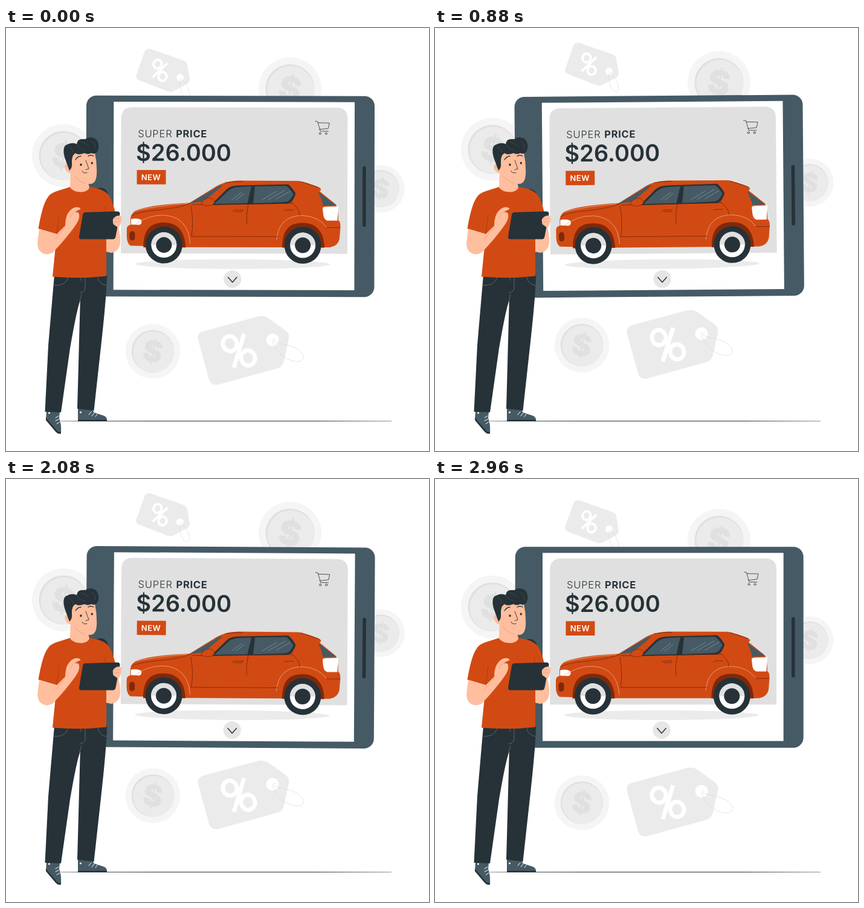
These frames come from a looping animation (700x700 px, 3 s). An HTML page:

```html
<!DOCTYPE html>
<html lang="en">
<head>
<meta charset="utf-8">
<title>Super price</title>
<style>
html, body { margin: 0; width: 100%; height: 100%; overflow: hidden; background: #fff; }
svg { display: block; width: 100vw; height: 100vh; }
text { font-family: Inter, Roboto, sans-serif; }
.line { fill: none; stroke: #263238; stroke-width: .7; stroke-linecap: round; stroke-linejoin: round; }
.dark { fill: #263238; }
.slate { fill: #455a64; }
.orange { fill: #d24a13; }
.maroon { fill: #80290a; }
.skin { fill: #ffbe9d; }
.pale { fill: #ebebeb; }
.grey { fill: #e0e0e0; }
.white { fill: #fff; }
</style>
</head>
<body>
<svg viewBox="0 0 700 700">
  <defs>
    <g id="coin">
      <circle r="52" fill="#f5f5f5"/>
      <circle r="40.5" class="grey"/>
      <circle cx="1.2" cy="1.2" r="38.8" class="pale"/>
      <text class="grey" transform="rotate(10)" y="20" font-size="56" font-weight="900" text-anchor="middle">$</text>
    </g>
    <g id="percent" fill="none" stroke="#fff" stroke-width="7">
      <ellipse cx="-15" cy="-11.5" rx="11.5" ry="12.5" transform="rotate(-15 -15 -11.5)"/>
      <ellipse cx="15" cy="12" rx="11.5" ry="12.5" transform="rotate(-15 15 12)"/>
      <path d="M8.500 -28L-8.500 28"/>
    </g>
    <g id="wheel">
      <path class="maroon" d="M-34 4C-34 -24 -24 -37 0 -37C23 -37 35 -22 36 4Z"/>
      <circle r="30.5" class="dark"/>
      <circle r="21" class="white"/>
      <path class="grey" d="M-21 0A21 21 0 0 1 21 0Z"/>
      <circle r="13" class="dark"/>
    </g>
  </defs>

  <g id="float">
    <use href="#coin" x="470" y="100.5"/>
    <use href="#coin" transform="translate(95 211)"/>
    <use href="#coin" transform="translate(243 535) scale(.87)"/>
    <use href="#coin" transform="translate(620 266) scale(.76)"/>

    <path class="pale" d="M240 35L294 54Q299 56 300 61L304 84Q305 89 300 92L278 104Q273 107 268 105L219 86Q214 83 215.500 78L229 40Q232 33 240 35Z"/>
    <circle cx="288" cy="82" r="6" class="white"/>
    <path class="line" style="stroke:#dcdcdc" d="M289 83Q303 96 304 110Q302 120 293 111Q286 98 288 86"/>
    <use href="#percent" transform="translate(255 70) rotate(30) scale(.58)"/>

    <path class="pale" d="M326 502L415 478Q426 475 434 480L463 501Q470 507 468 515L460 551Q458 560 450 563L352 590Q340 593 336 582L318 516Q315 506 326 502Z"/>
    <circle cx="441" cy="516" r="10.500" class="white"/>
    <path class="line" style="stroke:#dadada" d="M446 515Q440 513 442 521C449 541 470 553 484 552C497 550 494 538 480 530C470 524 455 524 443 518"/>
    <use href="#percent" x="385.500" y="534"/>
  </g>

  <path class="dark" d="M91 650.200Q365 649.700 638 650.200V650.800Q365 651.300 91 650.800Z"/>

  <g id="tablet">
    <rect class="slate" x="132.700" y="112.200" width="477" height="332.500" rx="16.500"/>
    <circle class="dark" cx="156" cy="278" r="13.200"/>
    <rect class="dark" x="590" y="228.500" width="5.600" height="100" rx="2.800"/>
    <rect class="white" x="178" y="122.300" width="398.700" height="311.300"/>
    <path class="grey" d="M190.300 373.300V150Q190.300 131.500 209 131.500H546.500Q565 131.500 565 150V373.300Z"/>
    <g class="dark">
      <text x="218" y="181" font-size="16.500" font-weight="300" letter-spacing=".8">SUPER</text>
      <text x="281" y="181" font-size="16.500" font-weight="700" letter-spacing=".7">PRICE</text>
      <text x="215" y="220" font-size="38" font-weight="600">$26.000</text>
    </g>
    <rect class="orange" x="216.500" y="235.300" width="48" height="23.700"/>
    <text class="white" x="223.700" y="252" font-size="13" font-weight="600" letter-spacing=".5">NEW</text>
    <g class="line" style="stroke-width:.8">
      <path d="M511.500 154L515.500 154.500L520 170.500H533M516 156.500L535 157L533 166L518.500 167.500"/>
      <circle cx="519.500" cy="174.300" r="1.600"/>
      <circle cx="529.500" cy="174.300" r="1.600"/>
    </g>
    <ellipse class="pale" cx="375" cy="390.800" rx="161" ry="8"/>
    <circle cx="375" cy="415.500" r="14.600" fill="#e6e6e6"/>
    <path class="line" style="stroke-width:1.500" d="M367.800 412.500L375 420.800L382.200 412.500"/>

    <g id="car">
      <path class="orange" d="M206 316Q207 305 218 301Q245 292 304 289.300L348 262Q362 253.500 384 252.500L484 252.800Q496 254.500 518 263.500Q524 266.500 519 270L545 291Q550 296 550 318Q554 320 553.500 330L552 349Q549 361 536 362.800L296 362.800L206 360.500Q200 356 200 345V333Q200 327 206 326Z"/>
      <path class="slate" d="M304 290L345 266Q350 261 359 260.500L327 287Z"/>
      <path class="dark" d="M339 293L365 267Q372 260.500 386 260.500L466 258.500Q470 259 479 273Q480 276 473 287Q470 290 464 290.500Z"/>
      <path class="slate" d="M345 291L367 270Q374 263.500 386 263L406 262L399.500 290Z"/>
      <path class="slate" d="M412 262L464 261Q469 265 475.500 274Q476 276 470 284Q467 287.500 460 288L409 290Z"/>
      <path class="slate" d="M516 270.500L546.500 293L525 294Q522 281 516 270.500Z"/>
      <path class="line" style="stroke:#90a0a8" d="M374 284L390 272M380 285L394 274M424 284L448 270M434 284L462 268M447 283L470 270"/>
      <path class="white" d="M207 316.500Q217 314 224 318Q226 324 221 326L207 325.500Z"/>
      <path class="white" d="M524 298Q525 295.500 529 295.500L550 295L548.500 318.500H532Q526 317 525 308Z"/>
      <rect class="maroon" x="204.500" y="336.500" width="9" height="15.500" rx="4.500"/>
      <g class="line" style="stroke:#f0ad8e;stroke-width:.8">
        <path d="M213 326Q235 309 262 310Q302 313 305 357M448 350Q451 311 490 310Q518 311 531 330M213 303Q250 294 300 290.500"/>
      </g>
      <g class="line" style="stroke:#5e210c">
        <path d="M208 311Q218 304 255 301Q293 297 306 290M306 295Q311 320 307 345H450M401 291Q397 308 398.500 325M473 289Q487 300 486 310M363 256Q376 253.500 392 254M488 254L518 264M308 292.500L474 290M530 330H553"/>
        <path d="M375 304Q376 301 380 301H392Q393 304 388 304H379M460 303Q461 301 465 301H476"/>
      </g>
      <path class="orange" stroke="#5e210c" stroke-width=".6" d="M323 291Q325 284 334 281.500Q343 281 345 287Q345 293 337 294Q327 295 323 291Z"/>
      <use href="#wheel" x="261.500" y="359.300"/>
      <use href="#wheel" x="491.300" y="359.300"/>
    </g>
  </g>

  <g id="man">
    <path class="slate" d="M67 635H89L88 645Q92 656 91 670Q88 673 83 668L66 647Z"/>
    <path class="dark" d="M66 645L84 666Q88 671 91 667V671Q87 673 82 668L66 649Z"/>
    <path class="slate" d="M119 630H144L145 636L163 642Q168 645 167 651H119Z"/>
    <path class="dark" d="M119 648.500H167V651H119Z"/>
    <path class="line" style="stroke:#fff;stroke-width:1" d="M82 645L87 642M82 650L88 647M84 655L89 652M137 640L141 635M142 642L146 637M148 643L151 639"/>
    <circle cx="71.500" cy="637" r="1.600" class="white"/>
    <circle cx="123.500" cy="636" r="1.600" class="white"/>
    <path class="dark" d="M80 409H167Q167 435 159 510L145.500 633L118 630L122.800 451Q117 466 106 530L91 636L64.500 635L70 525Z"/>
    <path class="line" style="stroke:#6b7c85" d="M80 426Q98 427 103 413M152 413Q154 424 166 426M131 413V431Q129 438 122 438M124 413V418M122 452L125 441"/>

    <path class="skin" d="M166 335L186 329Q191 350 188 361Q184 371 174 372L165 370Z"/>
    <path class="orange" d="M106 263L138 263Q163 266 171 278Q177 288 181 306L166 312V410.500Q123 415.500 77 411.500L84 341L53.500 332Q60 294 68 282Q73 273 84 270Z"/>
    <path class="line" style="stroke:#9d340c" d="M84 341L88 309M166 312L164 296"/>

    <path class="skin" d="M107 234L106 264Q112 272 126 271.500Q136 270 138 264L136 255Z"/>
    <path class="skin" d="M108 206Q128 201 147 206Q151 225 150 243Q149 257 140 258Q122 258 110 241Q98 240 97 229Q100 222 108 225Z"/>
    <path class="line" style="stroke:#e7967a" d="M112 244Q120 254 131 257M100 229Q105 229 106 236"/>
    <path class="dark" d="M105 236L97 214Q92 195 102 192.500Q109 189 117 192Q118 182 131 184Q139 178 149 184Q156 193 152 203Q149 210 141 207Q135 210 130 207Q119 211 115 207Q108 211 109 224Q110 231 105 236Z"/>
    <path class="line" style="stroke:#52616a;stroke-width:.5" d="M117 192Q121 200 130 202M125 189Q132 190 137 196M104 197Q110 199 111 206M142 188Q149 191 147 200"/>
    <ellipse class="dark" cx="124" cy="226.300" rx="1.600" ry="2"/>
    <ellipse class="dark" cx="142.300" cy="223.500" rx="1.600" ry="2"/>
    <path class="line" style="stroke-width:1.300" d="M115 218Q119 212 124 212M136 212Q140 209 145 212"/>
    <path class="line" style="stroke-width:.9" d="M132 219Q135 227 137 233L132 234.500M126 236.500Q127 241 134 239.500"/>

    <path class="skin" d="M55 333L84 341L98 327Q98 310 106 302Q113 295 121 297Q126 300 120 301L114 305Q120 304 121 308Q123 316 114 328Q99 349 77 372Q64 378 56 369Q51 363 52.500 352Z"/>
    <path class="dark" d="M131 305L184 303.500Q189 303.500 188.500 308L181.500 345Q180.500 349.500 177 349.500H125Q120.500 349.500 121 345L127 309Q128 305 131 305Z"/>
    <path class="skin" d="M179 314Q183 309 190 311Q193 315 191 320L188 328Q186 332 181 327Q176 325 177 320Q176 316 179 314Z"/>
    <path class="line" style="stroke:#e7967a" d="M179 317L188 315M178 322L187 320M106 314Q109 306 117 302M82 349Q90 338 98 329"/>
  </g>
</svg>
<script>
const float = document.getElementById('float');
const tablet = document.getElementById('tablet');

// Linear bob and sway, both 1.5 s long, shown at 24 pictures per second
function draw(now) {
  const step = Math.floor((now % 3000 + 4) * 24 / 1000);
  const p = (step + 1) / 36 % 1;
  const lift = 14 * (Math.abs(2 * p - 1) - 1) + .7;
  const tilt = 4 * Math.abs((p + .75) % 1 - .5) - 1;
  float.setAttribute('transform', `translate(0 ${lift})`);
  tablet.setAttribute('transform', `rotate(${tilt} 371 278.5)`);
}

const start = performance.now();
function tick() {
  draw(performance.now() - start);
  requestAnimationFrame(tick);
}
tick();
</script>
</body>
</html>
```
